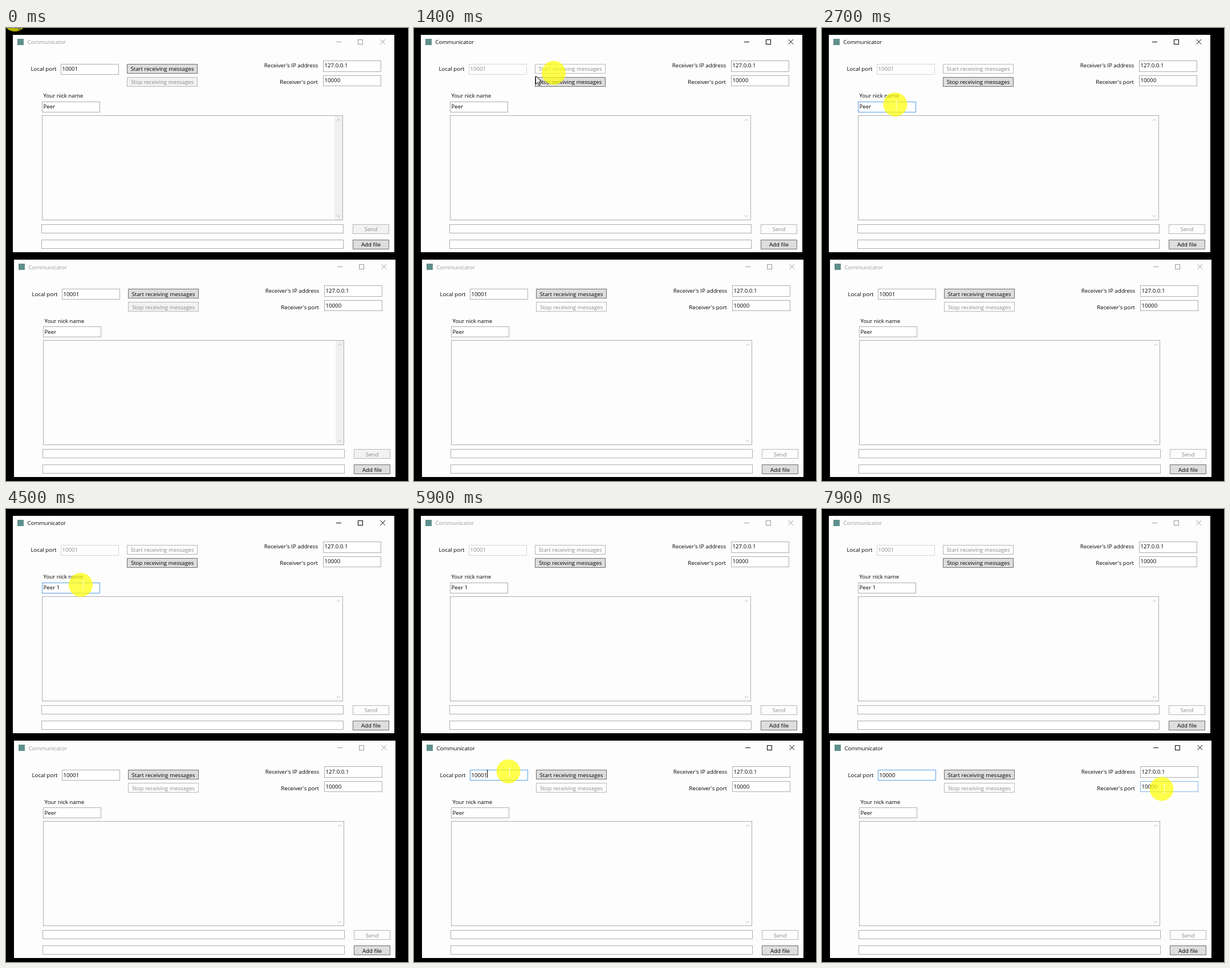
Write an HTML page with a canvas that moves like this. It is 705 by 794 pixels and loops after 8 s.

```html
<!DOCTYPE html>
<html lang="en">
<head>
<meta charset="utf-8">
<title>Communicator</title>
<style>
  html, body { margin: 0; width: 100%; height: 100%; overflow: hidden; background: #000; }
  canvas { display: block; }
</style>
</head>
<body>
<canvas id="stage" width="705" height="794"></canvas>
<script>
const ctx = document.getElementById('stage').getContext('2d');
const LOOP = 8000, STEP = 100;
const FONT = '9.7px "Open Sans", "Noto Sans", sans-serif';
const GREY = '#8a8a8a', FOCUS = '#569de5', HOVER = '#7eb4ea';

// Pointer path: time, x, y
const PATH = [
  [100, 17, -14], [300, 110, 20], [500, 250, 66], [600, 280, 75],
  [1300, 280, 75], [1400, 213, 84], [1500, 140, 122], [1600, 101, 146],
  [1800, 101, 146], [2000, 94, 146], [2300, 94, 146], [2400, 128, 143],
  [2500, 128, 143], [2600, 130, 135], [4400, 130, 135], [4500, 135, 133],
  [4600, 142, 151], [4800, 142, 151], [4900, 175, 330], [5000, 222, 475],
  [5100, 222, 477], [5200, 214, 475], [5400, 167, 461], [7200, 167, 461],
  [7300, 178, 463], [7500, 330, 500], [7700, 540, 505], [7800, 594, 493],
  [7900, 600, 490]
];

const within = (t, a, b) => t >= a && t < b;

function pointerAt(t) {
  const i = PATH.findIndex(p => p[0] >= t);
  if (i < 0) return PATH[PATH.length - 1].slice(1);
  if (i === 0) return PATH[0].slice(1);
  const [t0, x0, y0] = PATH[i - 1], [t1, x1, y1] = PATH[i];
  const k = (t - t0) / (t1 - t0);
  return [x0 + (x1 - x0) * k, y0 + (y1 - y0) * k];
}

function text(str, x, y, color = '#000', align = 'left') {
  ctx.fillStyle = color;
  ctx.textAlign = align;
  ctx.fillText(str, x, y);
}

function box(x, y, w, h, fill, border) {
  ctx.fillStyle = fill;
  ctx.fillRect(x, y, w, h);
  ctx.strokeStyle = border;
  ctx.strokeRect(x + .5, y + .5, w - 1, h - 1);
}

function line(color, ...pts) {
  ctx.strokeStyle = color;
  ctx.beginPath();
  for (let i = 0; i < pts.length; i += 2) ctx.lineTo(pts[i], pts[i + 1]);
  ctx.stroke();
}

function drawWindow(win, t, pointer) {
  const { dx, dy, drop, active, listening, name, port, focus, caret } = win;
  const px = pointer[0] - dx, py = pointer[1] - dy;
  const over = (x, y, w, h) => px >= x && px < x + w && py >= y && py < y + h;
  const pale = t < 200 ? '#f2f2f2' : '#fdfdfd';
  let beam = false;

  function button(label, x, y, w, h, base, enabled) {
    const hot = enabled && over(x, y, w, h);
    const fill = !enabled ? pale : hot ? '#bee6fd' : '#dddddd';
    box(x, y, w, h, fill, !enabled ? '#b4b6b9' : hot ? '#3c7fb1' : '#707070');
    text(label, x + w / 2, base + drop, enabled ? '#000' : GREY, 'center');
  }

  function field(id, value, x, y, w, h, base, enabled = true) {
    const hot = enabled && over(x, y, w, h);
    if (hot) beam = true;
    const border = !enabled ? '#d5d6d9' : focus === id ? FOCUS : hot ? HOVER : '#abadb3';
    box(x, y, w, h, enabled ? '#fff' : '#fdfdfd', border);
    text(value, x + 2.5, base + drop, enabled ? '#000' : GREY);
    if (focus === id && caret) {
      ctx.fillStyle = '#000';
      ctx.fillRect(Math.floor(x + 2.5 + ctx.measureText(value).width), base - 12, 1, 14);
    }
  }

  ctx.save();
  ctx.translate(dx, dy);
  ctx.fillStyle = '#fdfdfd';
  ctx.fillRect(12, 12, 669, 381);

  // Title bar
  const ink = active ? '#000' : '#999';
  ctx.fillStyle = '#5e8f8c';
  ctx.fillRect(20, 19, 11, 11);
  text('Communicator', 37.5, 28 + drop, ink);
  line(ink, 579, 24.5, 588, 24.5);
  ctx.strokeRect(617.5, 20.5, 8, 8);
  line(ink, 656.5, 20, 665, 28.5);
  line(ink, 665, 20, 656.5, 28.5);

  // Connection settings
  text('Local port', 43.5, 75 + drop);
  field('port', port, 96, 63, 102, 19, 75, !listening);
  button('Start receiving messages', 212, 63, 124, 17, 75, !listening);
  button('Stop receiving messages', 212, 86, 124, 17, 98, listening);
  text("Receiver's IP address", 547, 69 + drop, '#000', 'right');
  field('ip', '127.0.0.1', 556, 57, 102, 20, 69);
  text("Receiver's port", 547, 98 + drop, '#000', 'right');
  field('remote', '10000', 556, 83, 102, 19, 95);
  text('Your nick name', 65.5, 122 + drop);
  field('name', name, 63, 129, 102, 19, 141);

  // Message list
  box(63, 153, 528, 184, '#fdfdfd', '#abadb3');
  if (t < 200) {
    ctx.fillStyle = '#f0f0f0';
    ctx.fillRect(576, 154, 14, 182);
  }
  line('#bdbdbd', 580, 163, 583, 159.5, 586, 163);
  line('#bdbdbd', 580, 328, 583, 331.5, 586, 328);
  if (over(63, 153, 513, 184)) beam = true;

  field('message', '', 62, 344, 530, 16, 356);
  field('file', '', 62, 371, 530, 16, 383);
  button('Send', 608, 344, 64, 17, 356, false);
  button('Add file', 608, 371, 64, 17, 383, true);
  ctx.restore();
  return beam;
}

function drawPointer(x, y, beam) {
  if (beam) {
    ctx.fillStyle = '#ffffd8';
    x = Math.round(x);
    y = Math.round(y);
    ctx.fillRect(x, y - 6, 1, 13);
    ctx.fillRect(x - 2, y - 7, 5, 1);
    ctx.fillRect(x - 2, y + 7, 5, 1);
    return;
  }
  ctx.save();
  ctx.translate(x + .5, y);
  ctx.beginPath();
  for (const [a, b] of [[0, 0], [0, 14.5], [3.2, 11.5], [5.6, 17], [7.8, 16], [5.4, 10.6], [10, 10.3]]) ctx.lineTo(a, b);
  ctx.closePath();
  ctx.fillStyle = '#fff';
  ctx.fill();
  ctx.strokeStyle = '#000';
  ctx.stroke();
  ctx.restore();
}

function render(t) {
  const pos = pointerAt(t), prev = pointerAt(t - STEP);
  const switched = t >= 5700;

  ctx.fillStyle = '#000';
  ctx.fillRect(0, 0, 705, 794);
  ctx.font = FONT;
  ctx.lineWidth = 1;

  const upper = {
    dx: 0, dy: 0, drop: 0,
    active: within(t, 1200, 5700),
    listening: t >= 1200,
    name: t < 3400 ? 'Peer' : t < 3900 ? 'Peer ' : 'Peer 1',
    port: '10001',
    focus: within(t, 2600, 5700) ? 'name' : '',
    caret: within(t, 3100, 4500) || within(t, 5000, 5500)
  };
  const lower = {
    dx: 2, dy: 394, drop: 1,
    active: switched,
    listening: false,
    name: 'Peer',
    port: t < 6800 ? '10001' : t < 7300 ? '1000' : '10000',
    focus: switched ? 'port' : '',
    caret: within(t, 5700, 6500) || within(t, 6800, 7800)
  };
  const beamUp = drawWindow(upper, t, pos);
  const beamLow = drawWindow(lower, t, pos);

  // The highlight trails the pointer by half a step
  ctx.fillStyle = 'rgba(255, 255, 0, .7)';
  ctx.beginPath();
  ctx.arc((pos[0] + prev[0]) / 2 - 1.5, (pos[1] + prev[1]) / 2 - 1, 21, 0, Math.PI * 2);
  ctx.fill();
  drawPointer(pos[0], pos[1], beamUp || beamLow);
}

const start = performance.now();
function tick() {
  const t = (performance.now() - start) % LOOP;
  render(Math.floor(t / STEP) * STEP);
  requestAnimationFrame(tick);
}
tick();
</script>
</body>
</html>
```
